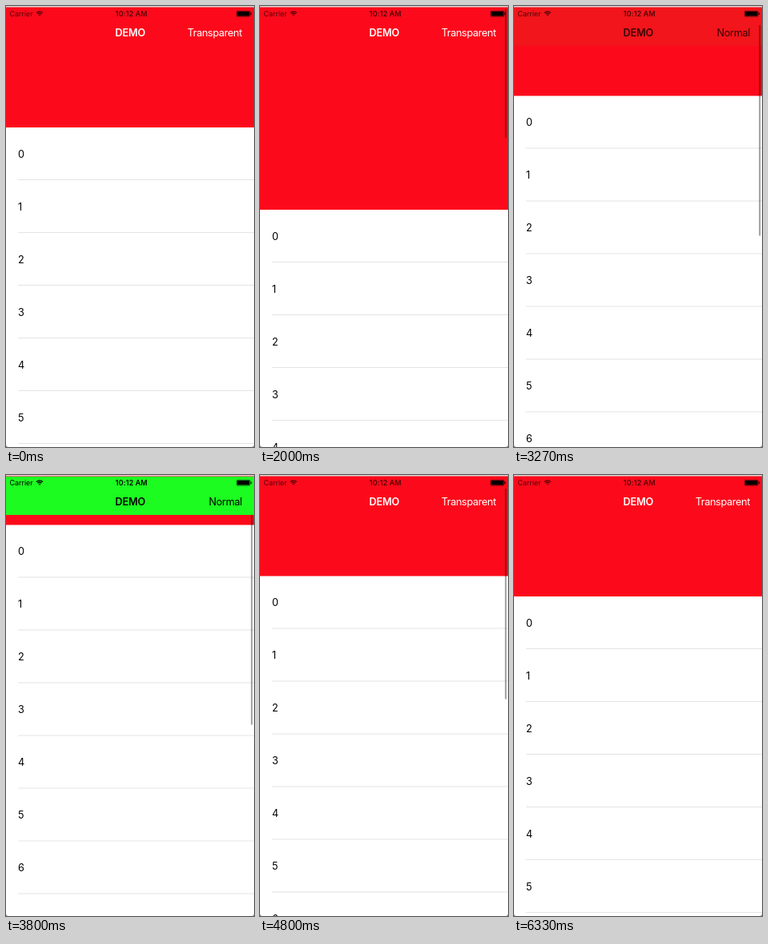
Write an HTML page with a canvas that moves like this. It is 310 by 552 pixels and loops after 6390 ms.

```html
<!DOCTYPE html>
<html lang="en">
<head>
<meta charset="utf-8">
<title>Navigation bar demo</title>
<style>
html, body { margin: 0; width: 310px; height: 552px; overflow: hidden; background: #fff; }
canvas { display: block; }
</style>
</head>
<body>
<canvas id="stage" width="310" height="552"></canvas>
<script>
const LOOP = 6390, STEP = 200 / 3, ROW = 66, REST = 152, PT = 0.749;
const g = document.getElementById('stage').getContext('2d');

// Lower edge of the red header: [ms, y]
const keys = [
  [0, 152], [1200, 152], [1333, 164], [1700, 235], [2000, 255], [2200, 231], [2667, 114.5],
  [3267, 112.5], [3400, 107], [3850, 61], [4050, 62], [4467, 88.5], [4733, 113],
  [5050, 182], [5333, 161], [5800, 152], [6390, 152]
];

const clamp = v => Math.max(0, Math.min(1, v));
const slope = i => (keys[i + 1][1] - keys[i][1]) / (keys[i + 1][0] - keys[i][0]);

// Monotone cubic tangent, flat at the turning points
function tangent(i) {
  if (i < 1 || i > keys.length - 2) return 0;
  const a = slope(i - 1), b = slope(i);
  return a * b > 0 ? 2 * a * b / (a + b) : 0;
}

function headerEdge(t) {
  let i = 0;
  while (i < keys.length - 2 && t >= keys[i + 1][0]) i++;
  const [t0, y0] = keys[i], [t1, y1] = keys[i + 1];
  const d = t1 - t0, u = (t - t0) / d, v = 1 - u;
  return y0 * (1 + 2 * u) * v * v + y1 * u * u * (3 - 2 * u)
    + d * u * v * (v * tangent(i) - u * tangent(i + 1));
}

function rect(color, x, y, w, h) {
  g.fillStyle = color;
  g.fillRect(x, y, w, h);
}

function text(str, x, y, color, { size = 12.75, weight = 400, align = 'left', gap = 0 } = {}) {
  g.font = `${weight} ${size}px Inter, Roboto, sans-serif`;
  g.letterSpacing = gap + 'px';
  g.textAlign = align;
  g.fillStyle = color;
  g.fillText(str, x, y);
}

function statusBar(color) {
  text('Carrier', 4.5, 13, color, { size: 9, gap: -0.05 });
  text('10:12 AM', 156.8, 13, color, { size: 9, weight: 600, align: 'center', gap: 0.1 });

  g.strokeStyle = color;
  g.lineWidth = 1.3;
  for (const r of [3.3, 5.6]) {
    g.beginPath();
    g.arc(42, 12.5, r, -Math.PI * 0.76, -Math.PI * 0.24);
    g.stroke();
  }
  g.beginPath();
  g.moveTo(42, 13);
  g.arc(42, 12.5, 1.7, -Math.PI * 0.76, -Math.PI * 0.24);
  g.fill();
}

function battery() {
  g.strokeStyle = g.fillStyle = '#000';
  g.lineWidth = 0.6;
  g.beginPath();
  g.roundRect(288.3, 6.3, 16.8, 6.8, 1.2);
  g.stroke();
  rect('#000', 289, 7, 15.4, 5.4);
  rect('#000', 305.8, 8.4, 1, 2.6);
}

function navBar(alpha) {
  rect(`rgba(28, 252, 32, ${alpha})`, 0, 2, 310, 48);
  const dark = alpha > 0;
  const color = dark ? `rgba(0, 0, 0, ${clamp(0.76 + alpha * 0.4)})` : '#fff';
  text('DEMO', 155.2, 38, color, { weight: 600, align: 'center', gap: -0.25 });
  text(dark ? 'Normal' : 'Transparent', 295, 38, color, { align: 'right', gap: -0.38 });
  statusBar(`rgba(0, 0, 0, ${clamp(0.66 + alpha * 0.4)})`);
  battery();
}

function list(top) {
  for (let i = 0, y = top; y < 552; i++, y += ROW) {
    text(String(i), 15, y + 37.7, '#000');
    rect('#e4e4e6', 15, y + ROW - 1, 295, 1);
  }
}

function scrollBar(offset, alpha) {
  const top = 4 + Math.max(0, offset) / 2;
  const length = 264 + Math.min(0, offset);
  g.fillStyle = `rgba(0, 0, 0, ${0.38 * alpha})`;
  g.beginPath();
  g.roundRect(306.2, top, 2, length, 1);
  g.fill();
}

function corner(x, dir) {
  g.fillStyle = '#777';
  g.beginPath();
  g.moveTo(x, 549);
  g.lineTo(x, 552);
  g.lineTo(x + 3 * dir, 552);
  g.quadraticCurveTo(x, 552, x, 549);
  g.fill();
}

function draw(t) {
  const edge = Math.round(headerEdge(t) * 2) / 2;
  const offset = REST - edge;
  rect('#fff', 0, 0, 310, 552);
  rect('#fc0a1b', 0, 0, 310, edge);
  list(edge);
  scrollBar(offset, clamp((t - 1230) / 100) * clamp((6050 - t) / 300));
  navBar(clamp((offset / PT - 50) / 64));
  rect('#dcd6d6', 0, 0, 310, 1.5);
  corner(0, 1);
  corner(310, -1);
}

function frame() {
  const t = performance.now() % LOOP;
  draw(Math.floor((t + 5) / STEP) * STEP);
  requestAnimationFrame(frame);
}
frame();
</script>
</body>
</html>
```
